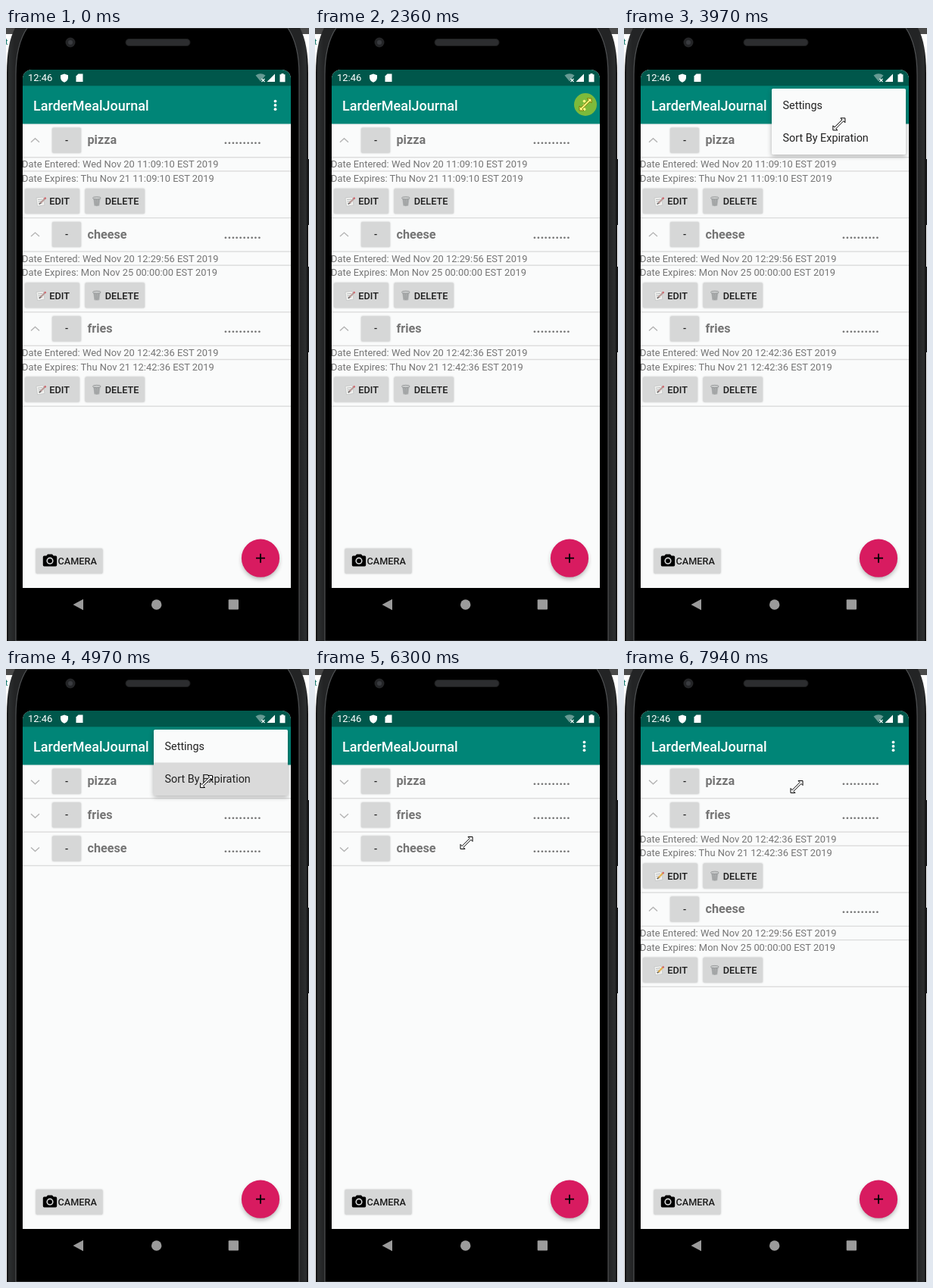
An HTML page for the animation above (8 s loop, 400x809 px).

```html
<!DOCTYPE html>
<html lang="en">
<head>
<meta charset="utf-8">
<title>Food list</title>
<style>
  html, body { margin: 0; width: 100%; height: 100%; overflow: hidden; background: #fff; }
  svg { display: block; width: 400px; height: 809px; font-family: Roboto, sans-serif; }
  .name { font-size: 16.2px; font-weight: 700; fill: #757575; }
  .dots { font-size: 17px; font-weight: 700; fill: #757575; }
  .date { font-size: 12.9px; fill: #757575; }
  .cap { font-size: 12.7px; font-weight: 500; fill: #1c1c1c; }
  .item { font-size: 14.4px; fill: #222; }
  .btn { fill: #d6d7d7; filter: drop-shadow(0 .7px .9px rgba(0,0,0,.24)); }
  .line { fill: #dcdcdc; }
  .chevron { fill: none; stroke: #b4b4b4; stroke-width: 1.4; }
</style>
</head>
<body>
<svg viewBox="0 0 400 809">
  <defs>
    <linearGradient id="rim">
      <stop offset="0" stop-color="#0c0c0d"/>
      <stop offset=".008" stop-color="#2c2e2f"/>
      <stop offset=".026" stop-color="#232425"/>
      <stop offset=".974" stop-color="#232425"/>
      <stop offset=".992" stop-color="#2c2e2f"/>
      <stop offset="1" stop-color="#0c0c0d"/>
    </linearGradient>
    <clipPath id="glass"><path d="M22 739V67a12 12 0 0 1 12-12H364a12 12 0 0 1 12 12V739z"/></clipPath>
    <filter id="soft" x="-50%" y="-50%" width="200%" height="200%"><feGaussianBlur stdDeviation="3"/></filter>
    <g id="memo">
      <path d="M0 1.5L9 .5L11 11L1.5 12.5z" fill="#f3f3f1" stroke="#b9bcbd" stroke-width=".6"/>
      <path d="M2 4L8 3.3M2.4 6.5L7 6M2.8 9L8 8.4" stroke="#a3a8aa" stroke-width=".8"/>
      <path d="M5 8.8L11.5 2.2" stroke="currentColor" stroke-width="2.2"/>
      <path d="M11 2.8L12.5 1.2" stroke="#d0626a" stroke-width="2.3"/>
      <path d="M4 9.9L5.6 8.2" stroke="#555" stroke-width="1.3"/>
    </g>
    <g id="bin">
      <path d="M1 2.5H10.6L9.4 12.4Q5.8 13.8 2.3 12.4z" fill="#b4b6b7"/>
      <path d="M3.2 4L4 12M5.8 4V12.5M8.4 4L7.6 12" stroke="#8b8e8f" stroke-width=".8"/>
      <ellipse cx="5.8" cy="2.2" rx="5.4" ry="1.7" fill="#c9cbcb" stroke="#838687" stroke-width=".7"/>
    </g>
  </defs>

  <!-- desk and phone -->
  <rect width="400" height="8" fill="#4a4a4a"/>
  <text x="-1" y="22" font-size="11" fill="#0d7468">t</text>
  <path d="M397 173h3v87h-3zM397 315h3v113h-3z" fill="#1b1c1d"/>
  <path d="M1 809V60Q1 20 12 0H388Q399 20 399 60V809z" fill="url(#rim)"/>
  <path d="M13 809V62Q13 22 28 0H372Q387 22 387 62V809z" fill="#000" stroke="#505254" stroke-width="1.2"/>
  <circle cx="85" cy="19" r="6.5" fill="#242527"/>
  <circle cx="85" cy="19" r="3" fill="#3a3c40"/>
  <rect x="158" y="14.5" width="85" height="9" rx="4.5" fill="#2c2d2f" stroke="#1d1e1f"/>

  <g clip-path="url(#glass)">
    <rect x="22" y="55" width="354" height="684" fill="#fafbfb"/>
    <rect x="22" y="76" width="354" height="50.5" fill="#008577" style="filter:drop-shadow(0 .5px .8px rgba(0,0,0,.15))"/>
    <rect x="22" y="55" width="354" height="21.3" fill="#00574b"/>
    <g fill="#fff">
      <text x="29" y="70.3" font-size="13">12:46</text>
      <path d="M77 60.5L82 62.3V66Q81.5 70 77 71.7Q72.5 70 72 66V62.3z"/>
      <path d="M95.5 60.5H101.5V71H92.5V63.5z"/>
      <path d="M329.5 62.5Q336 58 342.5 62.5L336 70.5z" opacity=".4"/>
      <path d="M337.5 67l4 4m0-4l-4 4" stroke="#fff" stroke-width="1.1"/>
      <path d="M355 60.5V71H344.5z"/>
      <path d="M363.5 60h3v1.3h2V71.3h-7V61.3h2z"/>
      <text x="36" y="109" font-size="18" font-weight="500">LarderMealJournal</text>
      <circle cx="355.5" cy="96.6" r="1.9"/>
      <circle cx="355.5" cy="101.9" r="1.9"/>
      <circle cx="355.5" cy="107.2" r="1.9"/>
      <circle id="ripple" cx="355.5" cy="101.5" opacity=".2"/>
    </g>

    <g id="list"></g>

    <rect class="btn" x="39.5" y="687" width="88" height="33" rx="1.5"/>
    <path d="M55 694.5h6l1.7 2H65.5a1.7 1.7 0 0 1 1.7 1.7V708.7a1.7 1.7 0 0 1-1.7 1.7H50.5a1.7 1.7 0 0 1-1.7-1.7V698.2a1.7 1.7 0 0 1 1.7-1.7H53.3z"/>
    <circle cx="58" cy="703.2" r="3.8" fill="none" stroke="#d6d7d7" stroke-width="1.6"/>
    <text class="cap" x="68.5" y="708">CAMERA</text>

    <circle cx="336" cy="703" r="24" fill="#000" opacity=".32" filter="url(#soft)"/>
    <circle cx="336" cy="699.7" r="25.1" fill="#d81b60"/>
    <path d="M330 699.7h12M336 693.7v12" stroke="#000" stroke-width="1.8"/>

    <g id="menu">
      <rect x="195" y="82" width="177" height="87" fill="#000" opacity=".3" filter="url(#soft)"/>
      <rect x="195" y="80" width="177" height="87" rx="1.8" fill="#fafbfb"/>
      <rect id="pressed" x="195" y="123.5" width="177" height="43.5" fill="#dadada"/>
      <text class="item" x="209.5" y="107.3">Settings</text>
      <text class="item" x="209.5" y="150.3">Sort By Expiration</text>
    </g>
  </g>

  <!-- navigation keys -->
  <g fill="#9b9b9b">
    <path d="M88.5 761L102 753.7V768.3z"/>
    <circle cx="198.7" cy="761" r="6.7"/>
    <rect x="293.7" y="754.3" width="13.3" height="13.3" rx="1"/>
  </g>

  <g id="pointer">
    <path d="M8-8V-2L5.900-4.100L-4.100 5.900L-2 8H-8V2L-5.900 4.100L4.100-5.900L2-8z" fill="#fff" stroke="#000"/>
    <circle id="glow" fill="#faf000" fill-opacity=".5"/>
  </g>
</svg>

<script>
const LOOP = 8000, GROUP = 44.4, CHILD = 79.9, TOP = 126.3;
const $ = id => document.getElementById(id);
const show = (el, on) => el.setAttribute('display', on ? 'inline' : 'none');
const within = (t, [from, to]) => t >= from && t < to;

// A detail block is open before the sort and again from its reopen time.
const SORT = 4970;
const foods = [
  { name: 'pizza',  entered: 'Wed Nov 20 11:09:10', expires: 'Thu Nov 21 11:09:10', reopen: Infinity },
  { name: 'cheese', entered: 'Wed Nov 20 12:29:56', expires: 'Mon Nov 25 00:00:00', reopen: 6920 },
  { name: 'fries',  entered: 'Wed Nov 20 12:42:36', expires: 'Thu Nov 21 12:42:36', reopen: 7550 }
];

const line = y => `<rect class="line" x="22" y="${y - .7}" width="354" height="1.4"/>`;
const button = (x, y, w) => `<rect class="btn" x="${x}" y="${y}" width="${w}" height="33" rx="1.5"/>`;

$('list').innerHTML = foods.map(f => `<g>
  <path class="chevron"/>
  ${button(61, 5.5, 38)}
  <text class="cap" x="78" y="26.5">-</text>
  <text class="name" x="107.5" y="27">${f.name}</text>
  <text class="dots" x="287.5" y="27.2">..........</text>
  ${line(GROUP)}
  <g transform="translate(0 ${GROUP})">
    <text class="date" x="21" y="13.7">Date Entered: ${f.entered} EST 2019</text>
    ${line(18.2)}
    <text class="date" x="21" y="32.4">Date Expires: ${f.expires} EST 2019</text>
    ${button(25, 41.3, 72)}${button(104.5, 41.3, 78.5)}
    <use href="#memo" x="40" y="52"/>
    <text class="cap" x="57.3" y="62.5">EDIT</text>
    <use href="#bin" x="114" y="51.5"/>
    <text class="cap" x="130.8" y="62.5">DELETE</text>
    ${line(CHILD)}
  </g>
</g>`).join('');

foods.forEach((f, i) => {
  f.row = $('list').children[i];
  f.chevron = f.row.querySelector('path');
  f.detail = f.row.lastElementChild;
});

// Pointer moves: start, end, steps, then start, control and end points.
const moves = [
  [580, 900, 5, [268, 845], [124, 680], [193, 549.5]],
  [1130, 1900, 11, [193, 549.5], [290, 230], [346.5, 97]],
  [1970, 2130, 3, [346.5, 97], [354, 97], [356, 99]],
  [2280, 2360, 2, [356, 99], [357, 100], [357, 101]],
  [3740, 4280, 8, [357, 101], [257, 129], [264.5, 148.5]],
  [5900, 6300, 6, [264.5, 148.5], [238, 185], [200, 229.5]],
  [6920, 7080, 3, [200, 229.5], [206, 205], [211, 185.5]],
  [7630, 7940, 5, [211, 185.5], [226, 132], [228, 155.5]]
];
const clicks = [[2280, 2510], [4660, 4890], [6680, 6840], [7160, 7390]];

// Share of a stepped change that is done at time t.
const stepped = (t, from, to, n) =>
  t < from ? 0 : Math.min(1, (Math.floor((t - from) / (to - from) * (n - 1) + .01) + 1) / n);

function pointerAt(t) {
  const [from, to, n, a, c, b] = moves.filter(m => t >= m[0]).pop();
  const u = stepped(t, from, to, n), v = 1 - u;
  return [0, 1].map(k => v * v * a[k] + 2 * u * v * c[k] + u * u * b[k]);
}

function drawList(t) {
  const sorted = t >= SORT;
  const order = sorted ? [0, 2, 1] : [0, 1, 2];
  let y = TOP;
  for (const i of order) {
    const f = foods[i], open = !sorted || t >= f.reopen;
    f.row.setAttribute('transform', `translate(0 ${y})`);
    f.row.style.color = sorted ? '#e5b04a' : '#b99b98';
    f.chevron.setAttribute('d', open ? 'M33 24.5l5.5-5l5.5 5' : 'M33 20.5l5.5 5l5.5-5');
    show(f.detail, open);
    y += GROUP + (open ? CHILD : 0);
  }
}

function drawMenu(t) {
  const grow = stepped(t, 3200, 3430, 4);
  const fade = stepped(t, 5130, 5290, 3);
  const s = .7 + .3 * grow;
  show($('menu'), grow > 0 && fade < 1);
  $('menu').setAttribute('opacity', grow * (1 - fade));
  $('menu').setAttribute('transform', `translate(372 80) scale(${s}) translate(-372 -80)`);
  $('pressed').setAttribute('opacity', stepped(t, 4740, 4890, 3));
  show($('ripple'), within(t, [2510, 2740]));
  $('ripple').setAttribute('r', 18.5 * stepped(t, 2510, 2660, 3));
}

function drawPointer(t) {
  show($('pointer'), t >= moves[0][0]);
  if (t < moves[0][0]) return;
  $('pointer').setAttribute('transform', `translate(${pointerAt(t)})`);
  const click = clicks.find(c => within(t, c));
  show($('glow'), !!click);
  $('glow').setAttribute('r', 15);
}

function frame() {
  const t = performance.now() % LOOP;
  drawList(t);
  drawMenu(t);
  drawPointer(t);
  requestAnimationFrame(frame);
}
frame();
</script>
</body>
</html>
```
